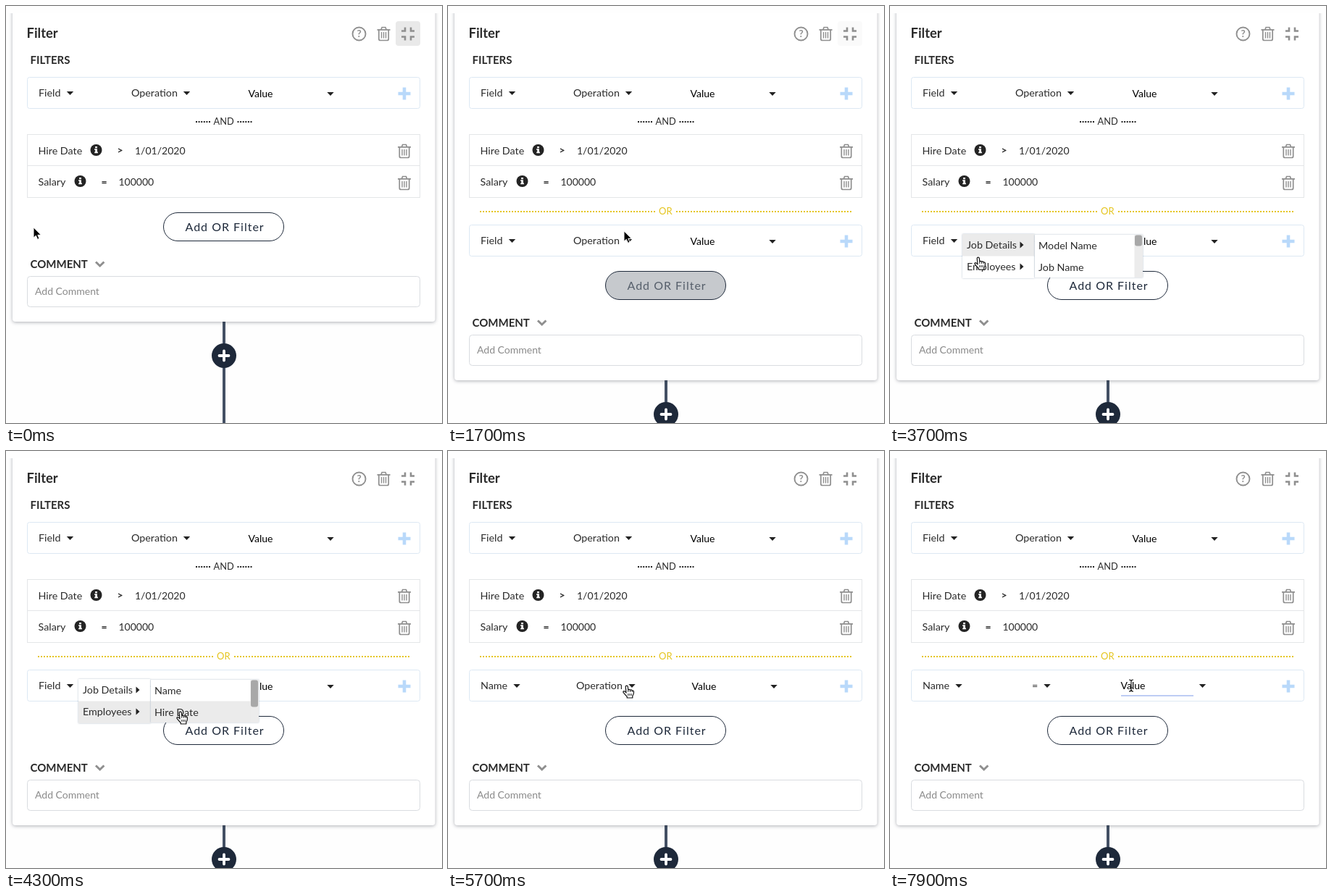
These frames come from a looping animation (602 by 576 pixels, 8 s). An HTML page:

```html
<!DOCTYPE html>
<html lang="en">
<head>
<meta charset="utf-8">
<title>Filter panel</title>
<style>
  html, body { margin: 0; width: 100%; height: 100%; overflow: hidden; background: #fefefe; }
  svg { display: block; width: 602px; height: 576px; font-family: Lato, sans-serif; }
  text { white-space: pre; }
  #card { filter: drop-shadow(0 1px 2.5px rgba(40, 45, 60, .38)); }
  .menu { filter: drop-shadow(0 0 1px rgba(70, 100, 130, .4)); }
</style>
</head>
<body>
<svg id="stage" viewBox="0 0 602 576"></svg>
<script>
const LOOP = 8000, STEP = 100, SHIFT = 81;
const INK = '#2b2b2b', NAVY = '#1e293a', GREY = '#8f8f8f';

// Drawing helpers
const text = (x, y, s, size = 14.3, fill = INK, extra = '') =>
  `<text x="${x}" y="${y}" font-size="${size}" fill="${fill}" ${extra}>${s.replace(/</g, '&lt;')}</text>`;
const bold = (x, y, s, size, fill = INK, extra = '') => text(x, y, s, size, fill, `font-weight="700" ${extra}`);
const rect = (x, y, w, h, fill, extra = '') =>
  `<rect x="${x}" y="${y}" width="${w}" height="${h}" fill="${fill}" ${extra}/>`;
const path = (d, stroke, width, extra = '') =>
  `<path d="${d}" fill="none" stroke="${stroke}" stroke-width="${width}" ${extra}/>`;
const at = (x, y, s) => `<g transform="translate(${x} ${y})">${s}</g>`;
const group = (id, s, extra = '') => `<g id="${id}" ${extra}>${s}</g>`;
const frame = (y, h, stroke, r = 3) => rect(29.5, y, 542, h, '#fff', `rx="${r}" stroke="${stroke}"`);

const caret = (x, y) => `<path d="M${x - 4.7} ${y - 2.5}h9.4l-4.7 5z" fill="#222"/>`;
const arrowRight = (x, y) => `<path d="M${x - 2.5} ${y - 4.5}v9l5-4.5z" fill="#222"/>`;
const dots = (x, y, len, color, gap) => path(`M${x} ${y}h${len}`, color, 2, `stroke-dasharray="2 ${gap}"`);
const plus = (x, y) => at(x, y, path('M-8.5 0H8.5M0 -8.5V8.5', '#b9d9fa', 4.6));
const trash = (x, y) => at(x, y,
  path('M-9 -5.7H9M-3.6 -6L-2.4 -9H2.4L3.6 -6M-6.7 -5V7Q-6.7 9 -4.7 9H4.7Q6.7 9 6.7 7V-5', GREY, 1.7) +
  path('M-3 -2.5V6M0 -2.5V6M3 -2.5V6', GREY, 1.4));
const info = (x, y) => at(x, y, '<circle r="8" fill="#242424"/>' +
  '<path d="M-1.4 -5h2.8v2.3h-2.8zM-2.3 -1.7h3.7v4.3h1v1.7h-4.7v-1.7h1v-2.6h-1z" fill="#fff"/>');
const inputs = (y, name, nameCaret, op, opX, opCaret, valueX, valueY, valueCaret) =>
  text(45, y, name) + caret(nameCaret, y - 4.5) + text(opX, y, op) + caret(opCaret, y - 4.5) +
  text(valueX, valueY, 'Value', 14, '#000') + caret(valueCaret, valueY - 4.5);

const header =
  bold(28.5, 44, 'Filter', 18.4) + bold(33.5, 80, 'FILTERS', 15) +
  `<circle cx="487.5" cy="38.5" r="9" fill="none" stroke="${GREY}" stroke-width="1.9"/>` +
  bold(487.5, 43.3, '?', 13.5, GREY, 'text-anchor="middle"') + trash(521.5, 38.5) +
  group('focus', rect(538, 21, 34, 34, '#e9e9e9', 'rx="4"')) +
  at(555, 38.5, path('M-9 -4H-4V-9M9 -4H4V-9M-9 4H-4V9M9 4H4V9', GREY, 2.6));

const firstFilter =
  frame(98.5, 43, '#dce8f3') + inputs(125, 'Field', 88.5, 'Operation', 173, 249.5, 334.5, 126, 448) + plus(550, 121) +
  dots(262, 160, 20, '#222', 1.6) + text(286.5, 164, 'AND', 12.8) + dots(319.5, 160, 20, '#222', 1.6) +
  frame(177.5, 87, '#e4e6e8', 0) + path('M29 220.5H572', '#e4e6e8', 1) +
  text(44.5, 205, 'Hire Date') + info(124.5, 199) + bold(153.5, 204, '>', 14) + text(178, 205, '1/01/2020', 14) +
  text(44.5, 248, 'Salary') + info(102.5, 242) + bold(131.5, 247.5, '=', 14) + text(155.5, 248, '100000', 14) +
  trash(550, 200.5) + trash(550, 244.5);

const orFilter =
  dots(44, 284, 243, '#e5c51f', 2) + text(291, 288, 'OR', 13, '#e5c51f') + dots(315, 284, 243, '#e5c51f', 2) +
  frame(302.5, 43, '#dce8f3') + plus(550, 325) +
  group('blank', inputs(329, 'Field', 88.5, 'Operation', 173, 249.5, 334.5, 330, 448)) +
  group('named', inputs(329, 'Name', 95, 'Operation', 177, 254, 336.5, 330, 450)) +
  group('equal', inputs(329, 'Name', 95, '=', 196, 217, 318.5, 330, 431.5)) +
  group('typing', inputs(329, 'Name', 95, '=', 196, 217, 318.5, 329, 431.5) + group('underline', rect(319, 337.5, 100, 1, '#7f9bea'))) +
  group('blink', rect(319.5, 315.5, 1, 16, '#111'));

const lower =
  rect(217.5, 285.5, 166, 39, NAVY, 'id="pill" rx="19.5" stroke="#1e293a"') +
  text(247.5, 311, 'Add OR Filter', 16, NAVY, 'id="label" letter-spacing="1"') +
  bold(33.5, 362, 'COMMENT', 15) + path('M124 353.5L129.7 359L135.4 353.5', GREY, 3) +
  frame(373.5, 42, '#d9dce0', 4) + text(40, 399, 'Add Comment', 14, '#8a8a8a');

const connector = rect(299, 430, 4, 170, '#435064') +
  `<circle cx="301" cy="483" r="17" fill="${NAVY}"/>` +
  path('M294.5 483H307.5M301 476.5V489.5', '#fff', 3.8, 'stroke-linecap="round"');

// Menus
const subMenu = (id, a, b, thumb) => group(id,
  rect(200, 316, 149, 59, '#fff') + group(id + 'A', rect(200, 316, 138, 29.5, '#ebebeb')) +
  group(id + 'B', rect(200, 345.5, 138, 29.5, '#ebebeb')) +
  rect(337.5, 316, 11.5, 59, '#ececec') + rect(338, 316.5, 10, thumb, '#a8a8a8', 'rx="3"') +
  text(205, 336, a) + text(205, 366, b), 'class="menu"');
const fieldMenu = group('fields',
  rect(100, 315, 99.5, 61, '#fff') + group('jobRow', rect(100, 315, 99.5, 30.5, '#ebebeb')) +
  group('staffRow', rect(100, 345.5, 99.5, 30.5, '#ebebeb')) +
  text(106, 335, 'Job Details') + arrowRight(182, 330) + text(106, 365, 'Employees') + arrowRight(182, 360), 'class="menu"');
const operators = ['=', '!=', '>', '>=', '<', '<=', 'Null', 'Not Null'];
const opMenu = group('ops', rect(266, 315, 78.5, 241.5, '#fff') +
  group('opRow', rect(266, 315, 78.5, 30, '#ebebeb')) +
  operators.map((s, i) => text(272, 335 + i * 30, s)).join(''), 'class="menu"');

// Pointers, each with its hot spot at 0,0
const outline = 'stroke-linejoin="round" stroke-linecap="round"';
const pointers =
  group('arrow', `<path d="M0 0V14.2L3.3 11.2L5.6 16.4L8 15.3L5.8 10.3H10.2Z" fill="#000" stroke="#fff" stroke-width="1" ${outline}/>`) +
  group('hand', `<path d="M-1.8 1.6Q-1.8 0.2 -.3 0.2Q1.2 0.2 1.3 1.6L1.8 6Q3.4 4.8 4.6 6.3Q6.2 5.4 7.2 7Q9.4 6.5 9.5 8.8
    Q9.6 12.2 7.8 14.4V17H.2V15.2Q-2.4 12.8 -4.8 9.6Q-5.7 8 -4 7.6Q-2.6 7.6 -1 10Z" fill="#fff" stroke="#111" stroke-width="1.2" ${outline}/>` +
    path('M1.8 6V9M4.6 6.5V9M7.2 7.2V9M1.8 11V14M4 11V14M6.2 11V14', '#111', .9)) +
  group('beam', path('M-3 -8Q0 -8 0 -6V6Q0 8 -3 8M3 -8Q0 -8 0 -6M0 6Q0 8 3 8M-1.8 3H1.8', '#111', 1.2));

document.getElementById('stage').innerHTML =
  '<clipPath id="below"><rect y="10" width="602" height="566"/></clipPath>' +
  group('line', connector) +
  `<g clip-path="url(#below)">${rect(9, -20, 583.5, 456, '#fff', 'id="card" rx="4"')}</g>` +
  header + firstFilter + group('or', orFilter) + group('lower', lower) +
  fieldMenu + subMenu('jobs', 'Model Name', 'Job Name', 15) + subMenu('staff', 'Name', 'Hire Date', 37) +
  opMenu + group('pointer', pointers);

// Pointer moves: start, end, x, y, ease-out power (0 = smooth both ways)
const start = [38, 306];
const moves = [
  [600, 1300, 243, 311, 0], [2400, 3100, 86, 324, 1.55], [3500, 3700, 122, 347, 1],
  [3700, 4300, 241, 360, 0], [4400, 4600, 238, 330, 1], [5600, 5700, 247, 324, 1],
  [6200, 6600, 280, 330, 0], [7000, 7200, 333, 324, 1]
];
const shapes = [[0, 'arrow'], [1200, 'hand'], [1600, 'arrow'], [3100, 'hand'],
  [5200, 'arrow'], [5700, 'hand'], [6700, 'arrow'], [7200, 'beam']];
const hover = [[1100, 0], [1200, .3], [1300, .6], [1400, .86], [1500, 1], [1600, .65], [1700, .25], [1800, 0]];

const held = (table, t) => table.reduce((v, [from, next]) => t >= from ? next : v, table[0][1]);
const el = id => document.getElementById(id);
const show = (id, on) => el(id).setAttribute('display', on ? 'inline' : 'none');
const move = (id, x, y) => el(id).setAttribute('transform', `translate(${x} ${y})`);
const between = (t, a, b) => t >= a && t < b;

function pointerAt(t) {
  let [x, y] = start;
  for (const [from, to, nx, ny, power] of moves) {
    if (t <= from) break;
    const u = Math.min(1, (t - from) / (to - from));
    const k = power ? 1 - (1 - u) ** power : u * u * (3 - 2 * u);
    x += (nx - x) * k;
    y += (ny - y) * k;
  }
  return [x, y];
}

function draw(t) {
  const open = t >= 1600, dy = open ? SHIFT : 0, p = held(hover, t);
  move('line', 0, dy);
  move('lower', 0, dy);
  el('card').setAttribute('height', 456 + dy);
  el('focus').setAttribute('opacity', open ? p : 1);
  el('pill').setAttribute('fill-opacity', p);
  const mix = c => Math.round(c + (255 - c) * p);
  el('label').setAttribute('fill', `rgb(${mix(30)},${mix(41)},${mix(58)})`);

  show('or', open);
  show('blank', t < 5200);
  show('named', between(t, 5200, 6700));
  show('equal', between(t, 6700, 7400));
  show('typing', t >= 7400);
  el('underline').setAttribute('opacity', Math.min(1, (t - 7300) / 300));
  show('blink', between(t, 7400, 7900));

  show('fields', between(t, 3300, 5200));
  show('jobRow', between(t, 3600, 3800));
  show('staffRow', t >= 3800);
  show('jobs', between(t, 3600, 3800));
  show('jobsA', false);
  show('jobsB', false);
  show('staff', between(t, 3800, 5200));
  show('staffA', t >= 4500);
  show('staffB', between(t, 4100, 4500));
  show('ops', between(t, 6000, 6700));
  show('opRow', t >= 6400);

  const shape = held(shapes, t);
  for (const id of ['arrow', 'hand', 'beam']) show(id, id === shape);
  move('pointer', ...pointerAt(t));
}

const begin = performance.now();
function tick() {
  const t = (performance.now() - begin) % LOOP;
  draw(Math.floor(t / STEP) * STEP);
  requestAnimationFrame(tick);
}
tick();
</script>
</body>
</html>
```
